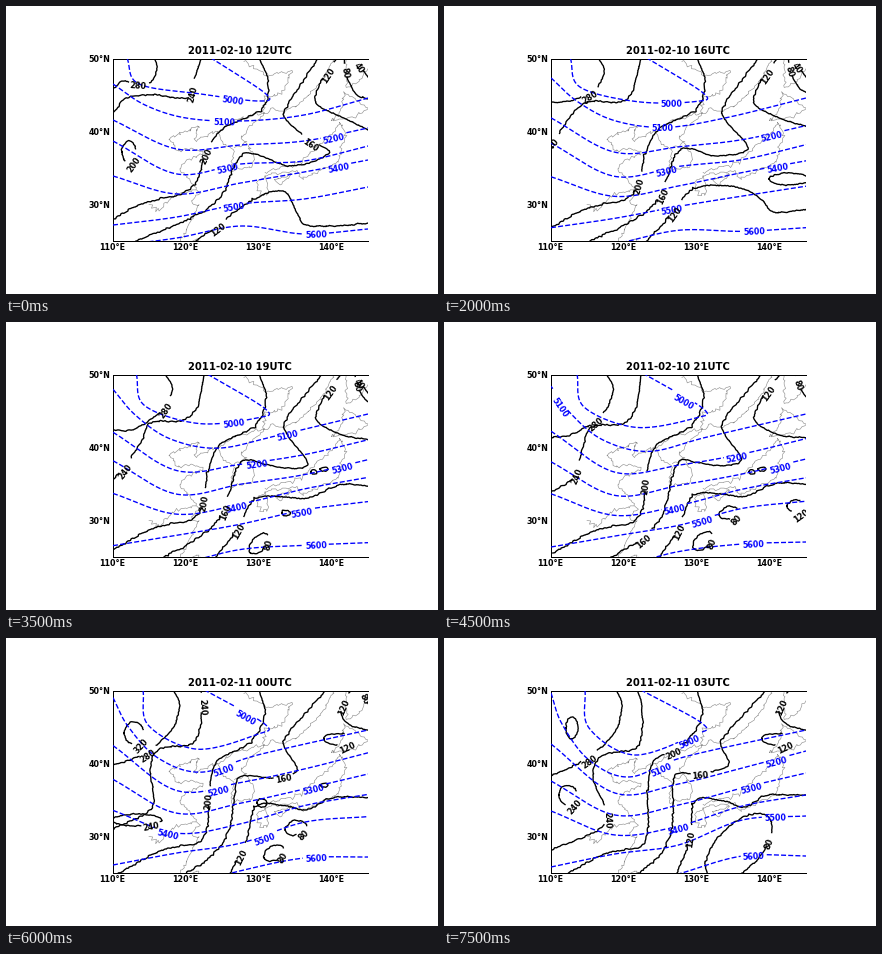
A matplotlib script for the animation above (8 s loop, 432 px wide and 288 px high).

```python
import numpy as np
import matplotlib.pyplot as plt
from matplotlib.animation import FuncAnimation

W, H = 432, 288
LEFT, RIGHT, TOP, BOTTOM = 106.5, 362, 52.5, 235
DEG = 7.3                      # pixels per degree
HOURS = 16

plt.rcParams.update({"font.family": "DejaVu Sans", "font.weight": "bold"})
rng = np.random.default_rng(5)

fig = plt.figure(figsize=(W / 72, H / 72), dpi=72, facecolor="white")
ax = fig.add_axes([LEFT / W, 1 - BOTTOM / H, (RIGHT - LEFT) / W, (BOTTOM - TOP) / H])
ax.set_xlim(LEFT, RIGHT)
ax.set_ylim(BOTTOM, TOP)
ax.set_xticks([LEFT + 10 * DEG * k for k in range(4)],
              [f"{110 + 10 * k}°E" for k in range(4)])
ax.set_yticks([BOTTOM - DEG * (lat - 25) for lat in (30, 40, 50)],
              ["30°N", "40°N", "50°N"])
ax.tick_params(length=0, pad=2, labelsize=8)
ax.spines[:].set_linewidth(1)
ax.spines["right"].set_visible(False)
title = fig.text((LEFT + RIGHT) / 2 / W, 1 - 48 / H, "", size=10, ha="center")


def pairs(flat):
    return np.reshape(flat, (-1, 2)).astype(float)


def spline(p, n=16):
    """Catmull-Rom curve through the points p."""
    q = np.vstack([2 * p[0] - p[1], p, 2 * p[-1] - p[-2]])
    t = np.linspace(0, 1, n, endpoint=False)[:, None]
    parts = [0.5 * (2 * b + (c - a) * t + (2 * a - 5 * b + 4 * c - d) * t**2
                    + (3 * b - a - 3 * c + d) * t**3)
             for a, b, c, d in zip(q, q[1:], q[2:], q[3:])]
    return np.vstack(parts + [p[-1:]])


def ellipse(x, y, rx, ry, tilt):
    a = np.linspace(-np.pi, np.pi, 80)
    u, v = rx * np.cos(a), ry * np.sin(a)
    c, s = np.cos(tilt), np.sin(tilt)
    return np.column_stack([x + c * u - s * v, y + s * u + c * v])


def resample(p, step=1.0):
    s = np.r_[0, np.cumsum(np.hypot(*np.diff(p, axis=0).T))]
    u = np.linspace(0, s[-1], max(int(s[-1] / step), 8))
    return np.column_stack([np.interp(u, s, p[:, k]) for k in (0, 1)])


def coast(*lonlat, rough=0.9):
    lon, lat = pairs(lonlat).T
    p = np.column_stack([LEFT + DEG * (lon - 110), BOTTOM - DEG * (lat - 25)])
    p = resample(p, 2)
    p[1:-1] += rng.normal(0, rough, p[1:-1].shape)
    ax.plot(*p.T, color="0.55", lw=0.6, zorder=1)


class Level:
    """A line whose shape moves between hourly keys, broken by its label."""
    all = []

    def __init__(self, text, keys, spots=None, span=(0, 15), blue=False):
        self.hours = list(keys)
        self.values = np.array(list(keys.values()), float)
        self.spots, self.span = spots or {}, span
        color = "blue" if blue else "black"
        self.line, = ax.plot([], [], color=color, lw=1.35, zorder=3 if blue else 2,
                             ls=(0, (3.7, 1.6)) if blue else "-")
        self.label = ax.text(0, 0, text, color=color, size=8, ha="center",
                             va="center_baseline", clip_on=True, zorder=4)
        self.half = 0.348 * 8 * len(text) + 1.5
        bumps = np.convolve(rng.normal(0, 0.8, 1600), np.ones(5) / 5, "same")
        self.bumps = bumps.reshape(-1, 2) * (not blue)
        Level.all.append(self)

    def outline(self, v):
        return spline(pairs(v))

    def spot(self, p, t):
        past = [h for h in self.spots if h <= t]
        if past:
            return np.argmin(np.hypot(*(p - self.spots[past[-1]]).T))

    def draw(self, t):
        shown = self.span[0] <= t <= self.span[1]
        self.line.set_visible(shown)
        self.label.set_visible(False)
        if not shown:
            return
        p = resample(self.outline([np.interp(t, self.hours, v) for v in self.values.T]))
        i = self.spot(p, t)
        if i is not None:
            n = int(self.half)
            (ax0, ay0), (ax1, ay1) = p[max(i - n, 0)], p[min(i + n, len(p) - 1)]
            angle = -np.degrees(np.arctan2(ay1 - ay0, ax1 - ax0))
            self.label.set(position=p[i], rotation=(angle + 90) % 180 - 90, visible=True)
        p[1:-1] += self.bumps[1:len(p) - 1]
        if i is not None:
            gap = np.hypot(*(p - p[i]).T) < self.half
            gap &= abs(np.arange(len(p)) - i) < 2 * self.half
            p[gap] = np.nan
        self.line.set_data(*p.T)


class Cell(Level):
    """A closed level, keyed by centre, radii and tilt."""

    def outline(self, v):
        return ellipse(*v)

    def spot(self, p, t):
        if self.label.get_text():
            return int(0.62 * len(p))


def height(text, start, end, spots):
    """A height line, given by its y at five even steps across the map."""
    x = np.linspace(107, 362, 5)
    flat = [np.column_stack([x, y]).ravel() for y in (start, end)]
    Level(text, dict(zip((0, 15), flat)), spots, blue=True)


def blip(first, last, x, y, rx, ry, text=""):
    Cell(text, {first: (x, y, rx, ry, 0)}, span=(first, last))


# mainland shore and borders
coast(119.3, 25, 121.9, 29.8, 120.8, 30.3, 121.8, 31.7, 119.2, 34.9, 120.3, 36.1, 122.5, 37,
      120.7, 37.8, 119, 37.3, 117.7, 39, 119.6, 39.9, 121.9, 40.9, 121.2, 38.8, 124.4, 40)
coast(124.4, 40, 125.2, 38.3, 126.6, 37.6, 126.3, 34.6, 129.2, 35.2, 129.4, 37, 127.5, 39.2,
      129.8, 41.5, 131.9, 43.2, 133, 42.7, 135, 43.4, 138.2, 46.3, 140.4, 50)
coast(124.4, 40, 126.9, 41.7, 130.6, 42.4, 131, 44.8, 133.1, 45.1, 134.7, 48.3, 131, 47.7, 128, 49.6)
coast(126.7, 37.8, 128.4, 38.6)
coast(115, 30, 116.3, 29.2, 118.4, 31.3, 121.4, 32)
# islands
coast(130.9, 33.9, 135.4, 34.6, 135.9, 33.5, 138.2, 34.6, 140.8, 35.7, 142, 39.5, 141.2, 41.4,
      139.9, 39.5, 137, 37, 136, 35.8, 130.9, 34.4)
coast(130.9, 33.9, 131.4, 31.4, 130.4, 31.3, 129.7, 33, 130.9, 33.9)
coast(132.2, 33.4, 134.6, 34.2, 133, 32.8, 132.2, 33.4)
coast(140, 41.5, 143.2, 42, 145, 43.2, 141.8, 45.4, 141.5, 43.3, 140, 41.5)
coast(142, 50, 142.1, 45.9, 143.4, 46.7, 145, 48.6)
coast(121, 25, 121.6, 25.3, 122, 25)

# height lines
Level("5000", {0: [121, 52, 133, 78, 195, 88, 252, 95, 260, 88, 205, 52],
               15: [141, 52, 145, 90, 190, 117, 250, 97, 259, 86, 197, 52]},
      {0: (227, 90), 9: (240, 73), 14: (245, 98)}, blue=True)
Level("5100", {0: [107, 78, 139, 99, 180, 112, 235, 115, 298, 109, 362, 92],
               15: [107, 55, 118, 86, 145, 122, 185, 139, 240, 119, 362, 92]},
      {0: (218, 116), 6: (282, 113), 8: (113, 79), 11: (218, 128)}, blue=True)
height("5200", [114, 143, 139, 135, 122], [106, 155, 146, 130, 113],
       {0: (328, 129), 6: (251, 142), 8: (294, 139), 11: (212, 148), 14: (333, 122)})
height("5300", [135, 168, 158, 155, 140], [143, 177, 167, 150, 135],
       {0: (222, 162), 6: (337, 146), 11: (308, 152)})
height("5400", [170, 188, 177, 166, 154], [173, 197, 188, 168, 157],
       {0: (333, 161), 6: (230, 182), 11: (161, 196), 14: (234, 188)})
height("5500", [219, 211, 198, 193, 181], [229, 216, 207, 182, 178],
       {0: (228, 200), 6: (296, 188), 8: (258, 196), 14: (331, 180)})
height("5600", [240, 232, 220, 228, 223], [262, 254, 236, 218, 218],
       {0: (310, 227)})

# levels of the second field, west to east
Level("280", {0: [148, 52, 151, 62, 145, 76, 130, 78, 117, 75, 107, 83],
              6: [157, 52, 165, 66, 157, 84, 140, 98, 124, 106, 107, 104],
              15: [172, 52, 178, 68, 170, 95, 147, 118, 127, 129, 107, 138]},
      {0: (132, 78), 2: (145, 85), 6: (158, 82), 8: (153, 98), 11: (145, 118)})
Level("240", {0: [195, 52, 188, 75, 182, 92, 148, 89, 120, 92, 112, 101, 107, 108],
              7: [198, 52, 192, 83, 178, 98, 145, 101, 136, 118, 119, 144, 107, 157],
              15: [193, 52, 198, 70, 194, 108, 158, 118, 149, 140, 162, 185, 107, 212]},
      {0: (184, 82), 2: (150, 95), 4: (118, 143), 11: (200, 64), 14: (160, 177)})
Level("200", {0: [253, 52, 262, 75, 256, 103, 218, 122, 201, 145, 184, 183, 135, 198, 107, 213],
              15: [253, 52, 258, 78, 240, 106, 210, 123, 204, 155, 200, 205, 160, 216, 110, 243]},
      {0: (201, 145), 2: (195, 175), 8: (199, 158), 14: (231, 115)})
Level("160", {0: [312, 52, 283, 97, 279, 112, 304, 134, 323, 147, 285, 160, 238, 148, 215, 190,
                  185, 212, 130, 235],
              7: [316, 52, 281, 96, 281, 112, 302, 142, 280, 146, 258, 142, 234, 141, 216, 192,
                  190, 217, 158, 235],
              15: [322, 52, 283, 95, 277, 107, 284, 127, 256, 136, 235, 135, 229, 145, 228, 190,
                   215, 218, 194, 235]},
      {0: (304, 134), 1: (220, 185), 8: (201, 215), 11: (278, 142), 14: (256, 136)})
Level("120", {0: [330, 52, 314, 78, 311, 98, 340, 113, 362, 124],
              10: [336, 52, 316, 81, 312, 100, 335, 113, 362, 115]},
      {0: (324, 65)}, (0, 10))
Level("120", {11: [344, 52, 335, 74, 344, 87, 362, 92]}, {11: (339, 64)}, (11, 15))
Level("80", {0: [338, 52, 340, 68, 350, 88, 362, 93], 12: [356, 52, 360, 62, 366, 70, 372, 76]},
      {0: (342, 64)}, (0, 13))
Level("40", {0: [349, 52, 354, 60, 362, 71]}, {0: (354, 58)}, (0, 7))
Level("120", {0: [190, 235, 212, 219, 245, 195, 277, 185, 291, 207, 300, 219, 330, 220, 362, 217],
              5: [206, 235, 229, 208, 247, 182, 275, 178, 305, 178, 324, 189, 330, 203, 362, 200],
              6: [207, 235, 229, 208, 247, 180, 270, 176, 300, 177, 323, 168, 340, 163, 362, 165],
              15: [233, 235, 246, 200, 251, 163, 280, 163, 300, 169, 320, 158, 340, 157, 362, 157]},
      {0: (212, 219), 2: (258, 187), 4: (234, 204), 11: (239, 215), 14: (248, 196)})

# closed cells
Cell("80", {6: (250, 223, 13, 7, -0.9), 12: (268, 215, 11, 7, -0.5)}, span=(6, 13))
Cell("80", {9: (285, 191, 10, 6, -0.2), 12: (290, 190, 11, 7, -0.2),
            15: (295, 209, 42, 22, -0.8)}, span=(8, 15))
blip(0, 1, 123, 146, 7, 11, "200")
blip(4, 5, 345, 173, 20, 6)
blip(6, 10, 308, 150, 3, 2)
blip(6, 13, 318, 147, 4, 2)
blip(6, 7, 280, 191, 4, 3)
blip(8, 10, 352, 184, 9, 6, "120")
blip(11, 13, 256, 165, 5, 4)
blip(11, 13, 128, 95, 10, 11, "320")
blip(11, 13, 131, 182, 25, 6, "240")
blip(11, 15, 333, 101, 15, 6, "120")
blip(14, 15, 128, 90, 6, 11)
blip(14, 15, 124, 157, 9, 10, "240")


def update(t):
    hour = 12 + t
    title.set_text(f"2011-02-{10 + hour // 24} {hour % 24:02d}UTC")
    for level in Level.all:
        level.draw(t)
    return []


anim = FuncAnimation(fig, update, frames=HOURS, interval=500, repeat=True, repeat_delay=0)
plt.show()
```
